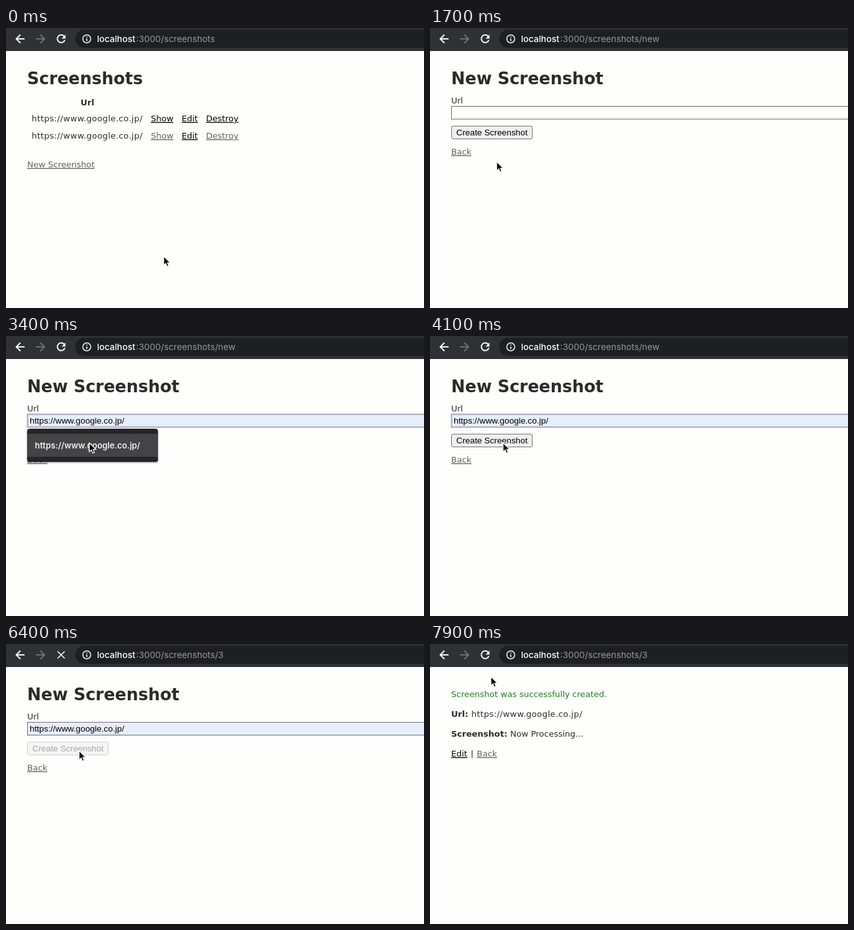
An HTML page that plays this animation: 652 px wide and 438 px high, repeating every 8000 ms.

```html
<!DOCTYPE html>
<html lang="en">
<head>
<meta charset="utf-8">
<title>Screenshots</title>
<style>
html, body { margin: 0; width: 100%; height: 100%; overflow: hidden; background: #fefefd; }
svg { display: block; }
text { font: 13px "DejaVu Sans", sans-serif; fill: #2b2b2b; white-space: pre; }
.h1 { font-size: 26px; font-weight: bold; }
.b { font-weight: bold; }
.link { fill: #000; text-decoration: underline; }
.visited { fill: #606060; text-decoration: underline; }
.hot { fill: #fff; text-decoration: underline; }
.address { letter-spacing: .33px; }
.notice { fill: #1a7f1a; }
.bar { font: 13.75px Inter, sans-serif; fill: #94979c; }
.host { fill: #fff; font-weight: 500; }
.form { font: 13.333px "Liberation Sans", Arial, sans-serif; fill: #000; }
.disabled { fill: #a6a6a6; }
.suggest { font: 600 12.9px Inter, sans-serif; fill: #f1f1f1; }
.icon { fill: none; stroke: #f4f4f4; stroke-width: 2; }
</style>
</head>
<body>
<svg id="stage" width="652" height="438" viewBox="0 0 652 438">
  <rect width="652" height="36" fill="#2f3135"/>
  <rect x="108" y="3" width="580" height="28" rx="14" fill="#1d1f23"/>
  <path class="icon" d="M29 17H16.5M22.5 10.5L16 17L22.5 23.5"/>
  <path class="icon" style="stroke:#6e7074" d="M47 17H59.500M53.500 10.500L60 17L53.500 23.500"/>
  <g id="reload">
    <path class="icon" d="M90.600 12.800A6 6 0 1 0 91.800 18.600"/>
    <path d="M92.900 10.200V16.400H86.700Z" fill="#f4f4f4"/>
  </g>
  <path id="stop" class="icon" style="stroke-width:1.700" d="M80.500 11.500L91.500 22.500M91.500 11.500L80.500 22.500"/>
  <circle class="icon" style="stroke-width:1.500" cx="126" cy="17" r="6.200"/>
  <path class="icon" style="stroke-width:1.600" d="M126 13.200V14.800M126 16.200V20.600"/>
  <text class="bar host" x="142" y="22">localhost</text>
  <text id="path" class="bar" x="203" y="22"></text>

  <g id="index">
    <text class="h1" x="33" y="88">Screenshots</text>
    <text class="b" x="127" y="121" text-anchor="middle">Url</text>
    <g id="rows"></g>
    <rect id="hover" x="33" y="206" width="106" height="16" fill="#000"/>
    <text id="create" x="33" y="218">New Screenshot</text>
  </g>

  <g id="new">
    <text class="h1" x="33" y="88">New Screenshot</text>
    <text x="33" y="118">Url</text>
    <rect id="field" x="33.500" y="122.500" width="640" height="20"/>
    <text id="value" class="form" x="37" y="137">https://www.google.co.jp/</text>
    <rect id="caret" y="125" width="1" height="15" fill="#000"/>
    <rect id="button" x="33.500" y="153.500" width="126" height="20" rx="2.500"/>
    <text id="label" x="41" y="168">Create Screenshot</text>
    <text class="visited" x="33" y="198">Back</text>
    <g id="popup">
      <rect x="32" y="147" width="206" height="52" rx="4" fill="#444" opacity=".3"/>
      <rect x="33" y="145" width="204" height="52" rx="4" fill="#252527"/>
      <rect id="choice" x="33" y="153" width="204" height="36" fill="#444446"/>
      <text class="suggest" x="45" y="176">https://www.google.co.jp/</text>
    </g>
  </g>

  <g id="show">
    <text class="notice" x="33" y="83">Screenshot was successfully created.</text>
    <text class="b" x="33" y="114">Url:</text>
    <text class="address" x="64.500" y="114">https://www.google.co.jp/</text>
    <text class="b" x="33" y="145">Screenshot:</text>
    <text x="125" y="145">Now Processing...</text>
    <text class="link" x="33" y="176">Edit</text>
    <text x="63.500" y="176">|</text>
    <text class="visited" x="73" y="176">Back</text>
  </g>

  <g id="pointer">
    <path id="arrow" d="M0 0V14.200L3.200 11.200L5.300 16.300L7.900 15.200L5.800 10.300H10.200Z" fill="#000" stroke="#fff" stroke-width="1.200"/>
    <path id="beam" d="M-3.500 -7.500H-1.500L0 -6L1.500 -7.500H3.500M0 -6V6M-3.500 7.500H-1.500L0 6L1.500 7.500H3.500M-2 1.500H2" fill="none" stroke="#000" stroke-width="1.200"/>
    <path id="hand" d="M-1.500 0.500Q0 -1 1.500 0.500V5.500L7 6.500Q8.500 7 8 9.500L7 15H0L-5 9.500Q-4.500 7 -1.500 9Z" fill="#fff" stroke="#000" stroke-width="1"/>
  </g>
</svg>
<script>
const LOOP = 8000, STEP = 100;
const $ = id => document.getElementById(id);
const show = (id, on) => { $(id).style.display = on ? '' : 'none'; };
const within = (t, from, to) => t >= from && t < to;
const paint = (id, attrs) => {
  for (const k in attrs) $(id).setAttribute(k, attrs[k]);
};

// Table rows of the index page
const row = (y, seen) => `
  <text class="address" x="40" y="${y}">https://www.google.co.jp/</text>
  <text class="${seen}" x="226" y="${y}">Show</text>
  <text class="link" x="274" y="${y}">Edit</text>
  <text class="${seen}" x="312" y="${y}">Destroy</text>`;
$('rows').innerHTML = row(146, 'link') + row(173, 'visited');

// Pointer stops: time, x, y
const stops = [
  [0, 246, 357], [300, 246, 357], [900, 104, 209], [1700, 104, 209],
  [1800, 113, 181], [2100, 141, 134], [2800, 141, 134], [3200, 130, 167],
  [3700, 130, 167], [4100, 114, 167], [7300, 114, 167], [7800, 95, 51], [LOOP, 95, 51]
];

function pointerAt(t) {
  const i = stops.findIndex(s => s[0] > t);
  const [t0, x0, y0] = stops[i - 1], [t1, x1, y1] = stops[i];
  const p = (t - t0) / (t1 - t0), e = p * p * (3 - 2 * p);
  return [x0 + (x1 - x0) * e, y0 + (y1 - y0) * e];
}

function draw(t) {
  const page = t < 1400 ? 'index' : t < 6600 ? 'new' : 'show';
  for (const id of ['index', 'new', 'show']) show(id, id === page);
  $('path').textContent = ':3000/screenshots' + (t < 1400 ? '' : t < 6300 ? '/new' : '/3');

  const loading = within(t, 4400, 6700);
  show('reload', !loading);
  show('stop', loading);

  const [x, y] = pointerAt(t);
  const onLink = page === 'index' && x < 139 && y > 205 && y < 222;
  show('hover', onLink);
  paint('create', { class: onLink ? 'hot' : 'visited' });

  const focus = within(t, 2200, 4300);
  const filled = t >= 3000;
  paint('field', {
    fill: filled ? '#e6eefb' : '#fefefd',
    stroke: focus ? '#a6a8bc' : '#6c6c6c',
    'stroke-width': focus ? 2 : 1
  });
  show('value', filled);

  const typedAt = t < 2600 ? 2200 : t < 3600 ? 2600 : 3600;
  show('caret', focus && (t - typedAt) % 1000 < 500);
  paint('caret', { x: t < 3600 ? 37 : 185 });

  show('popup', within(t, 2600, 3600));
  show('choice', y > 153);

  const sent = t >= 4400;
  paint('button', {
    fill: sent ? '#f5f5f5' : '#eeeeee',
    stroke: sent ? '#cfcfcf' : '#737373'
  });
  paint('label', { class: sent ? 'form disabled' : 'form' });

  const onField = page === 'new' && y > 122 && y < 143;
  show('beam', onField);
  show('hand', onLink);
  show('arrow', !onField && !onLink);
  paint('pointer', { transform: `translate(${Math.round(x)} ${Math.round(y)})` });
}

const start = performance.now();
function tick() {
  const t = (performance.now() - start) % LOOP;
  draw(Math.floor(t / STEP) * STEP);
  requestAnimationFrame(tick);
}
tick();
</script>
</body>
</html>
```
